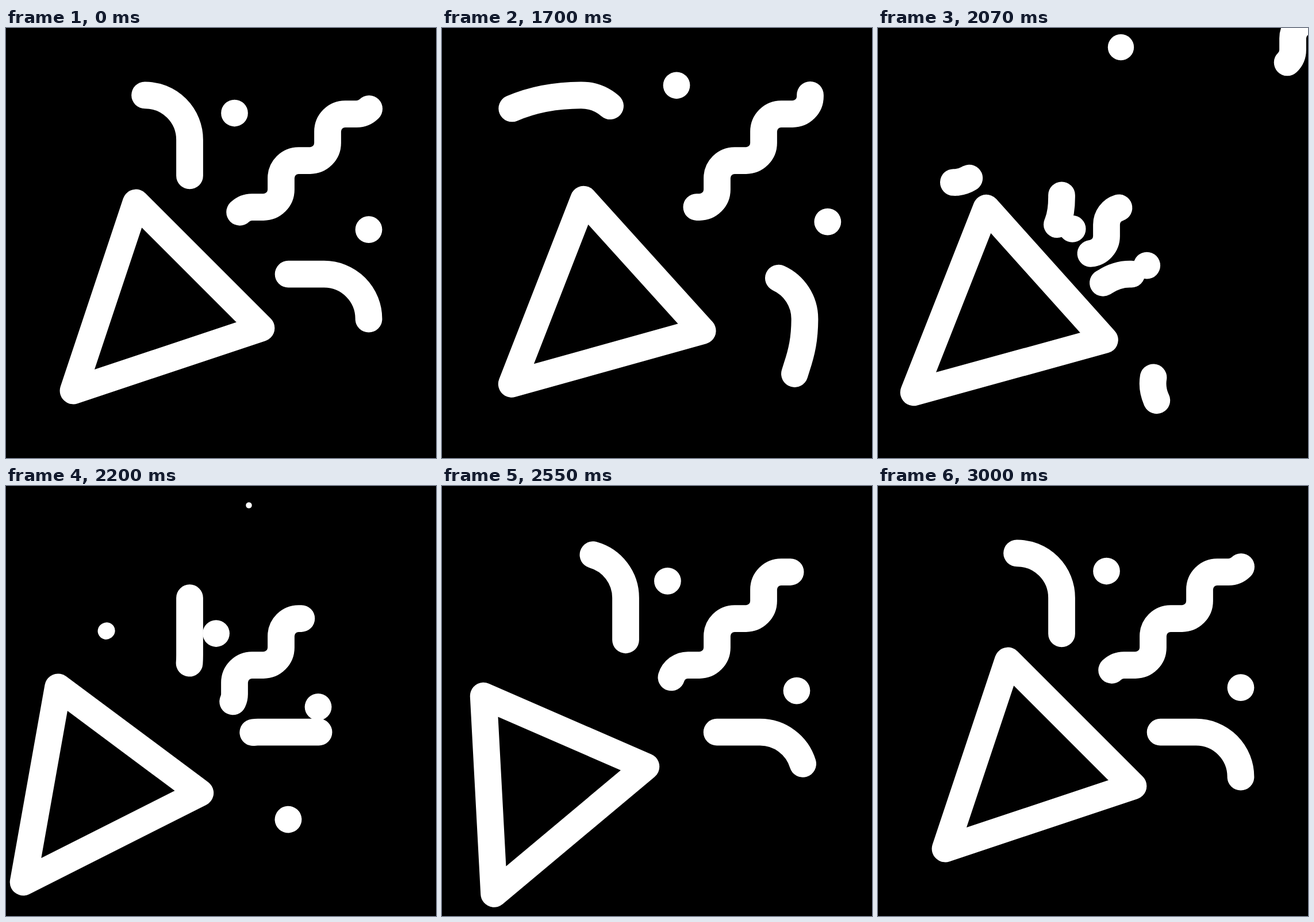
These frames come from a looping animation (748 px wide and 748 px high, 3020 ms). An HTML page:

```html
<!DOCTYPE html>
<html lang="en">
<head>
<meta charset="utf-8">
<title>Party popper</title>
<style>
  html, body { margin: 0; width: 100%; height: 100%; overflow: hidden; background: #000; }
  svg { display: block; width: 100%; height: 100%; }
</style>
</head>
<body>
<svg id="stage" viewBox="0 0 748 748" fill="none" stroke="#fff" stroke-width="46.75"
     stroke-linecap="round" stroke-linejoin="round">
  <rect width="748" height="748" fill="#000" stroke="none"/>
</svg>
<script>
const LOOP = 3020, START = 1510, FIRE = 2000, END = 3000, WIDTH = 46.75;
const stage = document.getElementById('stage');
const parts = [];

function add(tag, attrs) {
  const el = document.createElementNS('http://www.w3.org/2000/svg', tag);
  for (const k in attrs) el.setAttribute(k, attrs[k]);
  return stage.appendChild(el);
}

const span = (t, a, b) => Math.min(1, Math.max(0, (t - a) / (b - a)));
const mix = (a, b, ease) => t => a + (b - a) * ease(t);

// Soft start and end; a higher n settles sooner. n = 2 is smoothstep.
const swing = (a, b, n = 2) => t => {
  const x = span(t, a, b);
  return 1 - (1 - x) ** n * (1 + n * x);
};
const leave = (ms, n) => swing(START, START + ms, n);

// Sudden burst that slows down; a higher k is more sudden.
const burst = k => t => {
  const x = span(t, FIRE, END);
  return 1 - (1 - x) * Math.exp(-k * x);
};

// Accelerating flight without an end
const fly = t => (Math.max(0, t - START) / 560) ** 2.33;

const full = () => WIDTH;
const shrink = (a, b) => t => WIDTH * (1 - span(t, a, b));
const born = t => t < FIRE ? 0 : WIDTH;

// A stroke showing only the stretch of its path from tail to head
function ribbon(el, tail, head, size) {
  const total = el.getTotalLength();
  parts.push(t => {
    const w = size(t), a = Math.min(tail(t), total - 0.5);
    el.style.display = w > 0 ? '' : 'none';
    el.setAttribute('stroke-width', w);
    el.setAttribute('stroke-dasharray', `${Math.max(0.1, head(t) - a)} 9999`);
    el.setAttribute('stroke-dashoffset', -a);
  });
}

function dot(x, y, size) {
  const el = add('circle', { fill: '#fff', stroke: 'none' });
  parts.push(t => {
    el.setAttribute('cx', x(t));
    el.setAttribute('cy', y(t));
    el.setAttribute('r', size(t) / 2);
  });
}

// Each streamer rests on its middle stretch, between the lead-in and the way out.
function streamer(lead, rest, out, tailOut, headOut, size) {
  const probe = add('path', { d: lead });
  const a = probe.getTotalLength();
  probe.setAttribute('d', lead + rest);
  const b = probe.getTotalLength();
  probe.remove();
  const d = lead + rest + out;
  const old = add('path', { d }), total = old.getTotalLength();
  ribbon(old, mix(a, total, tailOut), mix(b, total, headOut), size);
  ribbon(add('path', { d }), mix(0, a, burst(2.8)), mix(0, b, burst(3.3)), born);
}

streamer(
  'M300 366Q307 353 312.5 339C318 325 319.5 310 319.5 294V257',
  'V194.5A77.7 77.7 0 0 0 241.8 116.8',
  'C190 117 145 127 105 148C85 159 65.5 182 65.5 207C65.5 224 71 237 82 249' +
  'C95 264 115 269 137 268.5Q149 267 158 261.5Q170 256 180 248',
  leave(822, 3), leave(1143, 6), shrink(2140, 2300));

streamer(
  'M364 460Q378 450 394 442Q415 428.2 438 428.2H491',
  'H553.3A77.7 77.7 0 0 1 631 505.9',
  'C631 540 626 563 617 590C607 622 602 640 590 653C577 670 559 682 541 682' +
  'C512 682 494 668 484 646C478 632 477 620 479 608C480 592 488 582 499 572',
  leave(774, 2.2), leave(1139, 5), shrink(2340, 2530));

// Wavy ribbon: quarter arcs joined by short straights
const wave = 'M347 392.5' +
  'h20a30.5 30.5 0 0 0 30.5 -30.5v-20a30.5 30.5 0 0 1 30.5 -30.5'.repeat(8);
const tail = 112, head = 451;
ribbon(add('path', { d: wave }), mix(tail, 584, fly), mix(head, 775, fly), full);
ribbon(add('path', { d: wave }), mix(0, tail, burst(2.2)), mix(0, head, burst(3.6)), born);
// Once the burst settles it lies where the first ribbon lay.

// A dot drifts from its place and fades while a new one is shot into it.
function confetti(x, y, dx, dy, fromX, fromY, size) {
  const out = leave(560, 3), shot = burst(3.6);
  dot(mix(x, x + dx, out), mix(y, y + dy, out), size);
  dot(mix(fromX, x, shot), mix(fromY, y, shot), born);
}
confetti(397.5, 148, 25, -114.5, 315, 428, shrink(2066, 2240));
confetti(631, 350.7, 94.6, -32.2, 404, 437.5, shrink(1880, 2050));

// Cone: leans forward, kicks back, then returns
const cone = add('path', { d: 'M226 304L444 522L117 631Z' });
const LEAN = 1960, BACK = 2415;

function kick(lean, back, n, home) {
  const fwd = swing(START, LEAN), rear = swing(LEAN, BACK, n);
  return t => lean * fwd(t) + (back - lean) * rear(t) - back * home(t);
}
const settle = swing(BACK, END, 3);
const dx = kick(29, -117, 5.8, settle);
const dy = kick(-11, 45.9, 4.3, settle);
const turn = kick(7.4, -21.5, 2, swing(2550, END));
parts.push(t => cone.setAttribute('transform',
  `translate(${dx(t)} ${dy(t)}) rotate(${turn(t)} 262.3 485.7)`));

const begin = performance.now();
function tick() {
  const t = (performance.now() - begin) % LOOP;
  for (const part of parts) part(t);
  requestAnimationFrame(tick);
}
tick();
</script>
</body>
</html>
```
